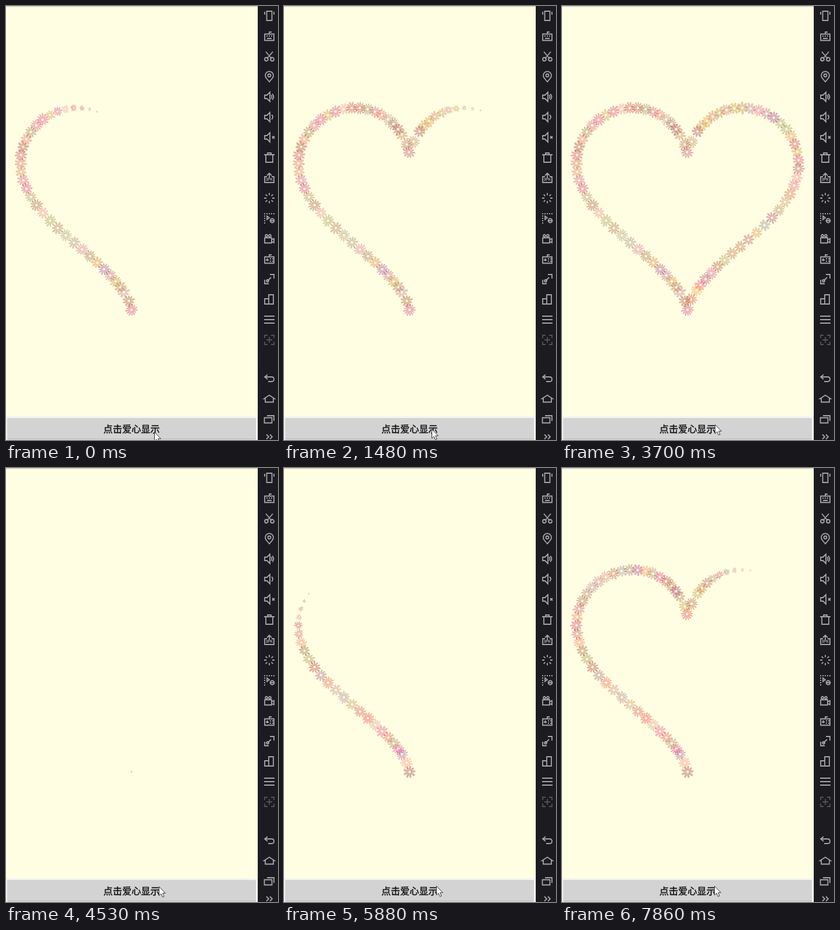
An HTML page with a canvas that plays this animation: 470x750 px, repeating every 8000 ms.

```html
<!DOCTYPE html>
<html lang="zh">
<head>
<meta charset="utf-8">
<style>
html, body { margin: 0; width: 100%; height: 100%; overflow: hidden; background: #fffee3; }
body { position: relative; }
canvas, svg { position: absolute; left: 0; top: 0; }
.edge { position: absolute; left: 0; top: 0; width: 435px; height: 1px; background: #c8c8bf; border-bottom: 1px solid #ecebd6; }
.bar { position: absolute; left: 0; top: 709px; width: 435px; height: 41px; background: #f4f4f0; }
.button {
  position: absolute; left: 2px; top: 3px; width: 430px; height: 36px; border-radius: 2px;
  background: #d3d3d3; box-shadow: 0 1px #aaa; color: #141414; text-align: center;
  font: 500 16.3px/36px "Noto Sans CJK SC", "Noto Sans CJK", sans-serif; -webkit-text-stroke: .4px #141414;
}
</style>
</head>
<body>
<canvas id="garden" width="435" height="709"></canvas>
<div class="edge"></div>
<div class="bar"><div class="button">点击爱心显示</div></div>
<svg width="470" height="750">
  <rect x="435" width="35" height="750" fill="#1b1b20"/>
  <g id="icons" fill="none" stroke="#a6a6aa" stroke-width="1.8"></g>
  <text x="455" y="302" font-family="Liberation Sans, sans-serif" font-size="6.5" font-weight="bold" fill="#a6a6aa" text-anchor="middle">3PK</text>
  <path id="cursor" d="M0 0V15.5L3.5 12.3 6 18 8.6 17 6.2 11.3H11Z" fill="#fff" stroke="#30303a"/>
</svg>
<script>
const LOOP = 8000, RESTART = 4410, STEP = 138;
const ctx = document.getElementById('garden').getContext('2d');
const cursor = document.getElementById('cursor');

// Side bar icons, each drawn around its own centre
const box = (w, h, x = 0, y = 0) => `M${x - w / 2} ${y - h / 2}h${w}v${h}h${-w}z`;
const ring = (r, x = 0, y = 0) => `M${x - r} ${y}a${r} ${r} 0 1 0 ${2 * r} 0a${r} ${r} 0 1 0 ${-2 * r} 0`;
const wave = r => `M${r} ${-r}q${r} ${r} 0 ${2 * r}`;
const repeat = (n, part) => Array.from({ length: n }, (_, k) => part(k)).join('');
const dots = (n, x, y) => repeat(n, k => `M${x + 4 * k} ${y}h2`);
const spoke = k => {
  const c = Math.cos(k * Math.PI / 4), s = Math.sin(k * Math.PI / 4);
  return `M${5 * c} ${5 * s}L${9 * c} ${9 * s}`;
};
const speaker = 'M-8-3h4l5-5V8l-5-5h-4z';
const pad = box(16, 11, 0, 2) + 'M0-4v-3h4';

const tools = [
  box(9, 16) + 'M-8-7v5M8-7v5',
  pad + dots(3, -5, 0) + 'M-4 4h8',
  'M-6-8L4 4M6-8L-4 4' + ring(3, -5, 5) + ring(3, 5, 5),
  'M0 9L-5 3A7 7 0 1 1 5 3z' + ring(2.5, 0, -2),
  speaker + wave(3) + wave(5),
  speaker + wave(4),
  speaker + 'M5-2l4 4m0-4l-4 4',
  'M-9-5H9M-3-6v-2h6v2M-6-4V8H6V-4',
  'M-4-2h-4V8H8V-2h-4M0 0v-8m-4 4l4-4 4 4',
  repeat(8, spoke),
  dots(5, -9, -8) + repeat(4, k => dots(1, -9, 4 * k - 4)) + 'M-4-4l4 3-4 3z' + ring(3.5, 5, 4) + 'M2 4h6',
  box(12, 9, -2, 3) + ring(2, -5, -5) + ring(2, 1, -5) + 'M4 2l4-2v7l-4-2',
  pad + 'M-6 2h5M-3.500-1v5' + dots(2, 1, 0) + dots(2, 1, 4),
  'M-3 3l6-6M1-8h7v7M-8 1v7h7' + ring(2, -3, 3),
  box(7, 9, -4.5, 3.5) + box(8, 16, 3),
  repeat(3, k => `M-9 ${6 * k - 6}h18`),
  'M-8-3v-5h5m6 0h5v5m0 6v5h-5m-6 0h-5v-5M0-5v10M-5 0h10'
];
const keys = [
  'M-3-6l-5 4 5 4m-5-4h12q4 0 4 4t-4 4h-6',
  'M-9 0l9-6 9 6h-2v6h-14v-6z',
  box(13, 9, -2, 2) + 'M-4-6h12v9',
  repeat(2, k => `M${6 * k - 5}-9l4 4-4 4`)
];
const column = (list, top, gap) => list.map((d, k) =>
  `<path transform="translate(455 ${top + gap * k})" d="${d}"${k === 16 ? ' opacity=".4"' : ''}/>`).join('');
document.getElementById('icons').innerHTML = column(tools, 17, 35) + column(keys, 643, 35.5);

function rnd(seed) {
  const v = Math.sin(seed * 12.9898) * 43758.5453;
  return v - Math.floor(v);
}

// Points on the heart; those too close to an earlier one are dropped
const spots = [];
for (let i = 0; i < 100; i++) {
  const t = (10 + i * 0.2) / Math.PI;
  const x = 217 + 192 * Math.sin(t) ** 3;
  const y = 320 - 12.08 * (13 * Math.cos(t) - 5 * Math.cos(2 * t) - 2 * Math.cos(3 * t) - Math.cos(4 * t));
  if (spots.every(s => Math.hypot(s.x - x, s.y - y) > 10.6)) spots.push({ i, x, y });
}

function flower(x, y, age, seed) {
  const petals = 8 + Math.floor(rnd(seed) * 6);
  const turn = rnd(seed + 0.3) * 2 * Math.PI;
  const half = Math.PI / petals;
  const [r, g, b] = [128, 0, 0].map((low, k) => low + 128 * rnd(seed + 0.2 * k + 0.1));
  ctx.fillStyle = `rgba(${r},${g},${b},.32)`;
  for (let k = 0; k < petals; k++) {
    const a = turn + 2 * half * k;
    const grow = Math.min(1, (age + 1) / 8 * (0.8 + 0.4 * rnd(seed + k * 2.3)));
    const inner = 2.2 * grow;
    const reach = side => 16 * grow * (0.75 + 0.25 * rnd(seed + k * 1.7 + side * 0.4));
    const at = (dist, side) => [x + dist * Math.cos(a + side * half), y + dist * Math.sin(a + side * half)];
    ctx.beginPath();
    ctx.moveTo(...at(inner, -1));
    ctx.bezierCurveTo(...at(reach(-1), -1), ...at(reach(1), 1), ...at(inner, 1));
    ctx.fill();
  }
}

// Key poses: time, position of the drawing head along the heart, pointer x and y
const runs = [
  [[0, 37.3, 256, 736], [1480, 65.3, 255, 731], [2620, 87.3, 286, 738], [3700, 108, 264, 723]],
  [[RESTART, -1, 264, 723], [4530, 0.3, 264, 723], [5880, 28.3, 263, 722], [7860, 64.3, 263, 722]]
];

// The screen refreshes in equal steps of about STEP ms between two poses
function pose(list, t) {
  const next = list.findIndex(p => p[0] > t);
  if (next < 0) return list[list.length - 1];
  const a = list[next - 1], b = list[next];
  const steps = Math.round((b[0] - a[0]) / STEP);
  const f = Math.floor((t - a[0]) / (b[0] - a[0]) * steps) / steps;
  return a.map((v, k) => v + (b[k] - v) * f);
}

function draw(t) {
  const run = t < RESTART ? 0 : 1;
  const [, head, px, py] = pose(runs[run], t);
  ctx.clearRect(0, 0, 435, 709);
  for (const { i, x, y } of spots) {
    if (i <= head) flower(x, y, head - i, i + 1 + run * 200);
  }
  cursor.setAttribute('transform', `translate(${px + 0.5} ${py + 0.5})`);
}

const begin = performance.now();
function frame() {
  draw((performance.now() - begin) % LOOP);
  requestAnimationFrame(frame);
}
frame();
</script>
</body>
</html>
```
